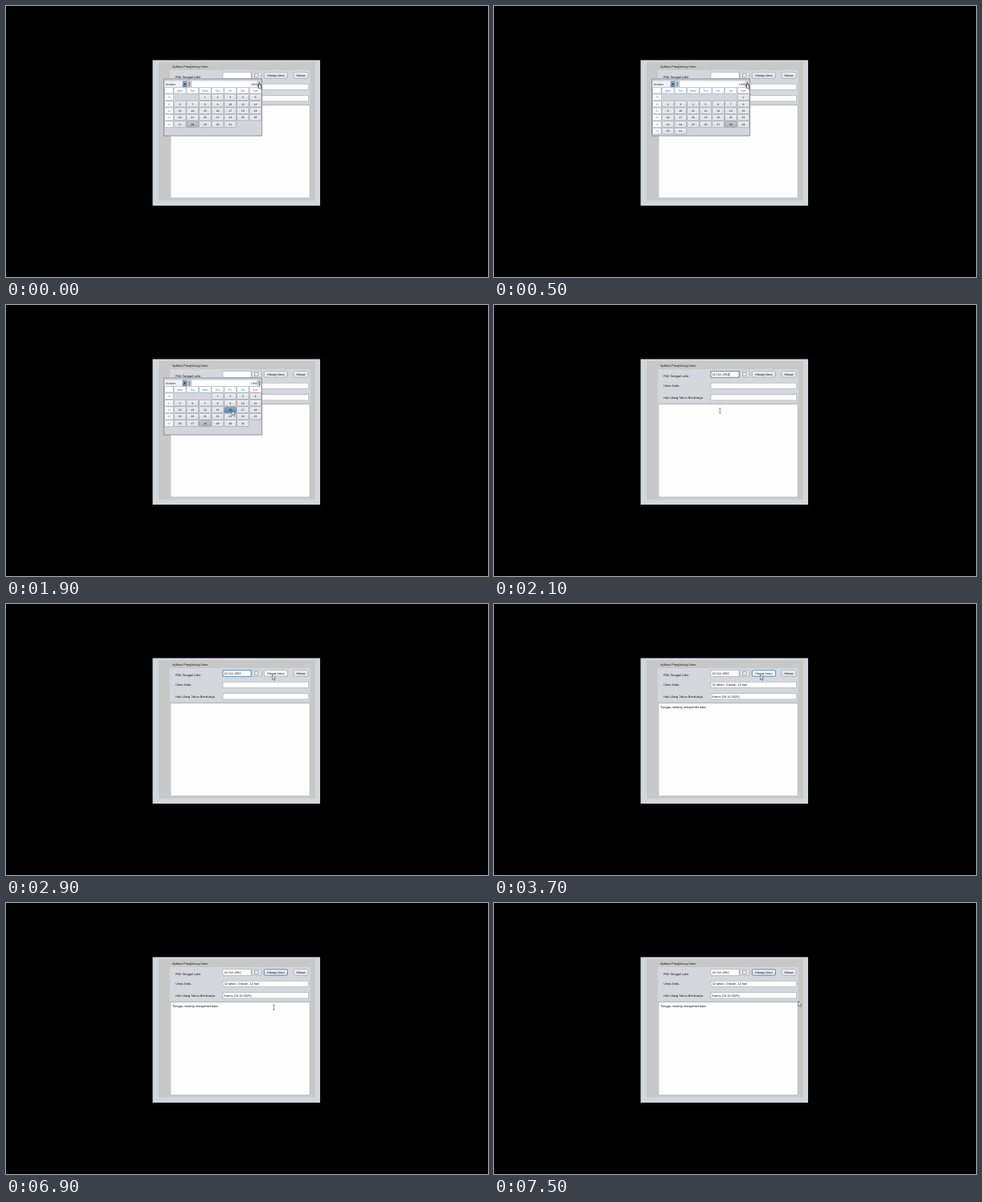
Write an HTML page that moves like this. It is 600 px wide and 338 px high and loops after 8000 ms.

```html
<!DOCTYPE html>
<html lang="id">
<head>
<meta charset="utf-8">
<title>Aplikasi Penghitung Umur</title>
<style>
  html, body { margin: 0; width: 100%; height: 100%; overflow: hidden; background: #000; }
  svg { display: block; width: 100vw; height: 100vh; }
  text { font-family: "Liberation Sans", Arial, sans-serif; font-size: 3.87px; fill: #181818; text-rendering: geometricPrecision; }
  .mid { text-anchor: middle; }
  .end { text-anchor: end; }
  .cell { font-size: 3.5px; }
  .head { fill: #1583b4; }
  .sun { fill: #e0182c; }
  .week { fill: #6d84a8; }
  .field { fill: #fff; stroke: #9599a1; stroke-width: .5; }
  .button { fill: url(#face); stroke: #85898f; stroke-width: .5; }
  .hover { fill: url(#lit); }
  .picked { fill: url(#dark); }
  .pressed { fill: url(#blue); }
  .focus { stroke: #5f8cb8; stroke-width: 1; }
  .hidden { display: none; }
</style>
</head>
<body>
<svg viewBox="0 0 600 338" preserveAspectRatio="none">
  <defs>
    <linearGradient id="face" x2="0" y2="1"><stop stop-color="#f6f7f9"/><stop offset=".5" stop-color="#dfe2e7"/><stop offset="1" stop-color="#e9ebef"/></linearGradient>
    <linearGradient id="lit" x2="0" y2="1"><stop stop-color="#fff"/><stop offset="1" stop-color="#f0f2f5"/></linearGradient>
    <linearGradient id="dark" x2="0" y2="1"><stop stop-color="#c9c9c9"/><stop offset="1" stop-color="#b2b2b2"/></linearGradient>
    <linearGradient id="blue" x2="0" y2="1"><stop stop-color="#8fb0cb"/><stop offset="1" stop-color="#5584a9"/></linearGradient>
  </defs>
  <rect width="600" height="338"/>
  <rect x="182.5" y="67.5" width="208.5" height="181.5" fill="#d2d7dc"/>
  <rect x="190" y="70" width="195" height="172.5" fill="#c8c8c8"/>
  <rect x="204" y="80" width="174.5" height="42" fill="#d4d7dc"/>
  <rect x="205" y="124" width="173" height="115.2" fill="#fefefe" stroke="#b4b6ba" stroke-width=".5"/>

  <text x="207" y="77.3">Aplikasi Penghitung Umur</text>
  <text x="211" y="89.6">Pilih Tanggal Lahir</text>
  <text x="211" y="102.3">Umur Anda</text>
  <text x="211" y="116.8">Hari Ulang Tahun Berikutnya</text>

  <rect id="date" class="field" x="270" y="82.7" width="35" height="7.6"/>
  <rect class="field" x="270" y="97.2" width="106.5" height="7.2"/>
  <rect class="field" x="270" y="111.7" width="106.5" height="7.2"/>

  <rect class="button" x="306.3" y="82.8" width="11.6" height="7.4" rx="1.2"/>
  <rect x="309.4" y="84.6" width="4.6" height="3.6" fill="#f4f4f4" stroke="#666" stroke-width=".5"/>
  <rect id="count" class="button" x="321.3" y="82.8" width="29.2" height="7.4" rx="1.2"/>
  <text class="mid" x="335.9" y="87.9">Hitung Umur</text>
  <rect class="button" x="358" y="82.8" width="18" height="7.4" rx="1.2"/>
  <text class="mid" x="367" y="87.9">Keluar</text>

  <text id="birth" x="271.6" y="87.9">16 Oct 1992</text>
  <path id="caret" d="M292.9 84.2V89" stroke="#000" stroke-width=".5"/>
  <g id="age">
    <text x="271.6" y="102.3">32 tahun, 0 bulan, 12 hari</text>
    <text x="271.6" y="116.8">Kamis (16-10-2025)</text>
  </g>
  <text id="wait" x="207" y="130.1">Tunggu, sedang mengambil data...</text>

  <g id="popup">
    <rect x="196.7" y="91" width="122" height="71" fill="#d2d5dc" stroke="#70747c" stroke-width=".7"/>
    <rect x="197.3" y="93.8" width="23" height="7.2" fill="#f0f2f5"/>
    <text class="cell" x="198.6" y="98.7">October</text>
    <rect class="button pressed" x="220" y="93.8" width="5" height="7.2"/>
    <path d="M221.2 96.5h2.6l-1.3 2z" fill="#14202c"/>
    <rect x="231" y="93.8" width="82" height="7.2" fill="#fff"/>
    <text id="year" class="cell end" x="312.6" y="98.8"></text>
    <g id="spinners"></g>
    <g id="days"></g>
  </g>

  <path id="arrow" d="M0 0V6L1.4 4.8L2.4 7L3.3 6.6L2.4 4.5H4.2Z" fill="#fff" stroke="#222" stroke-width=".5"/>
  <path id="beam" d="M-1.2 -2.9H1.2M0 -2.9V2.9M-1.2 2.9H1.2" fill="none" stroke="#4a5058" stroke-width=".6"/>
</svg>
<script>
const LOOP = 8000, STEP = 100;
const COL = 15.65, ROW = 8.45, LEFT = 209.1, TOP = 110;
const NAMES = ["Mon", "Tue", "Wed", "Thu", "Fri", "Sat", "Sun"];
const $ = id => document.getElementById(id);
const show = (id, on) => $(id).classList.toggle("hidden", !on);

// Pointer moves: start, number of steps, from, to, easing power
const MOVES = [
  [1000, 7, [314.5, 97], [281.3, 131.8], 1.55],
  [2300, 7, [281.3, 131.8], [331.5, 88.3], 1.5],
  [4700, 6, [331.5, 88.3], [321.5, 132], 1.5],
  [6900, 7, [321.5, 132], [379, 122.7], 1.5]
];

function pointer(t) {
  let at = MOVES[0][2];
  for (const [start, steps, from, to, power] of MOVES) {
    if (t < start) break;
    const k = Math.min(1, ((t - start) / STEP + 1) / steps);
    const e = 1 - (1 - k) ** power;
    at = from.map((v, i) => v + (to[i] - v) * e);
  }
  return at;
}

const inside = ([px, py], x, y, w, h) => px >= x && px < x + w && py >= y && py < y + h;

const rect = (x, y, w, h, cls) =>
  `<rect x="${x}" y="${y}" width="${w}" height="${h}" rx=".8" class="${cls}"/>`;

const cell = (x, y, w, label, box, ink = "") =>
  rect(x, y, w, 7.5, box) +
  `<text class="cell mid ${ink}" x="${x + w / 2}" y="${y + 5.1}">${label}</text>`;

function isoWeek(date) {
  const thu = new Date(date);
  thu.setUTCDate(date.getUTCDate() + 3 - (date.getUTCDay() + 6) % 7);
  return 1 + Math.floor((thu - Date.UTC(thu.getUTCFullYear(), 0, 1)) / 6048e5);
}

function calendar(year, at, pressed) {
  const offset = (new Date(Date.UTC(year, 9, 1)).getUTCDay() + 6) % 7;
  let out = cell(197.5, 101.6, 10.8, "", "field");
  NAMES.forEach((name, i) => {
    out += cell(LEFT + i * COL, 101.6, 14.9, name, "field", i === 6 ? "sun" : "head");
  });
  for (let row = 0; row * 7 < offset + 31; row++) {
    const week = isoWeek(new Date(Date.UTC(year, 9, 1 - offset + row * 7)));
    out += cell(197.5, TOP + row * ROW, 10.8, week, "field", "week");
  }
  for (let day = 1; day <= 31; day++) {
    const slot = offset + day - 1;
    const x = LEFT + slot % 7 * COL, y = TOP + Math.floor(slot / 7) * ROW;
    const over = inside(at, x, y, 14.9, 7.5);
    const look = over ? (pressed ? "pressed" : "hover") : day === 28 ? "picked" : "";
    out += cell(x, y, 14.9, day, "button " + look);
  }
  return out;
}

function spinner(x, look) {
  const arrows = `M${x + 1.4} 96.4h2.6l-1.3 -1.6zM${x + 1.4} 98.6h2.6l-1.3 1.6z`;
  return rect(x, 93.8, 5.4, 3.6, "button") + rect(x, 97.4, 5.4, 3.6, "button " + look) +
    `<path d="${arrows}" fill="#26394c"/>`;
}

function draw(now) {
  const t = Math.floor(now % LOOP / STEP) * STEP;
  const at = pointer(t);
  const open = t < 2100;

  show("popup", open);
  if (open) {
    const year = 2003 - Math.round(1.6 * Math.min(t / STEP, 7));
    $("year").textContent = year;
    $("days").innerHTML = calendar(year, at, t >= 1900);
    $("spinners").innerHTML = spinner(225.4, "") +
      spinner(312.9, t < 1000 ? "pressed" : t < 1900 ? "focus" : "");
  }

  const typing = t >= 2100 && t < 3400;
  show("birth", !open);
  show("caret", typing && Math.floor((t - 2100) / 500) % 2 === 0);
  $("date").classList.toggle("focus", typing);
  show("age", t >= 3600);
  show("wait", t >= 3700);

  const count = $("count").classList;
  const over = !open && inside(at, 321, 82.5, 30, 8);
  const down = t >= 3400 && t < 3600;
  count.toggle("focus", t >= 3400);
  count.toggle("pressed", down);
  count.toggle("hover", over && !down);

  const text = !open && (inside(at, 205, 124, 173, 115) ||
    inside(at, 270, 97, 106.5, 7.5) || inside(at, 270, 111.5, 106.5, 7.5));
  show("beam", text);
  show("arrow", !text);
  $(text ? "beam" : "arrow").setAttribute("transform", `translate(${at})`);
}

const begin = performance.now();
let last = -1;
function tick() {
  const now = performance.now() - begin;
  const step = Math.floor(now / STEP);
  if (step !== last) draw(now);
  last = step;
  requestAnimationFrame(tick);
}
tick();
</script>
</body>
</html>
```
